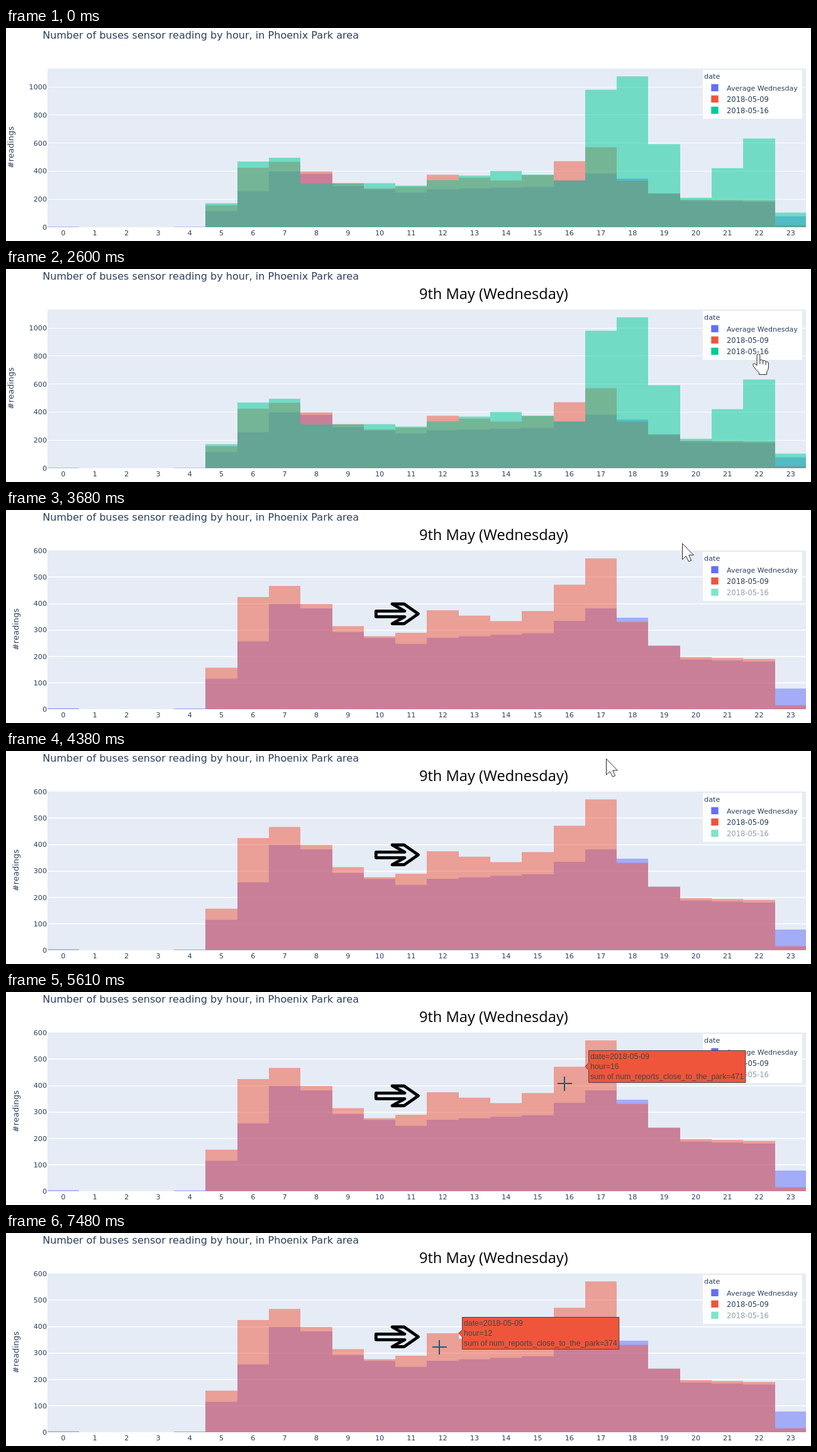
Animation, 1280 px wide and 340 px high, one loop 8 s. Source, as an HTML page with a canvas:

```html
<!DOCTYPE html>
<html lang="en">
<head>
<meta charset="utf-8">
<title>Bus sensor readings by hour</title>
<style>
  html, body { margin: 0; width: 100%; height: 100%; overflow: hidden; background: #fff; }
  canvas { display: block; }
</style>
</head>
<body>
<canvas id="stage" width="1280" height="340"></canvas>
<script>
const ctx = document.getElementById('stage').getContext('2d');
const LOOP = 8000, STEP = 77, HEADING_AT = 1890, FILTER_AT = 2910, CLICK = [2450, 2600];
const PLOT = { left: 66, right: 1272.9, top: 64.6, bottom: 318 };
const BIN = (PLOT.right - PLOT.left) / 24;
const INK = '#2a3f5f';
const SANS = '"DejaVu Sans", sans-serif';

// Turning points of each day by hour; the hours between them are interpolated
const series = [
  { name: 'Average Wednesday', color: '#636efa', size: 11.05,
    turns: { 0: 4, 1: 0, 3: 0, 4: 3, 5: 115, 7: 398, 8: 381, 9: 292, 11: 247, 12: 270, 15: 287, 17: 381, 18: 346, 19: 240, 20: 188, 22: 180, 23: 78 } },
  { name: '2018-05-09', color: '#ef553b', size: 11.5,
    turns: { 4: 0, 5: 157, 6: 424, 7: 466, 8: 398, 9: 314, 10: 276, 11: 289, 12: 374, 14: 333, 15: 371, 17: 570, 18: 330, 19: 240, 20: 197, 22: 190, 23: 15 } },
  { name: '2018-05-16', color: '#00cc96', size: 11.5,
    turns: { 4: 0, 5: 171, 6: 468, 7: 495, 8: 312, 10: 314, 11: 297, 12: 335, 14: 401, 15: 375, 16: 332, 17: 980, 18: 1075, 19: 592, 20: 210, 22: 632, 23: 104 } }
];
for (const day of series) day.values = Array.from({ length: 24 }, (_, hour) => valueAt(day.turns, hour));

// Pointer moves: first step, last step, destination
const moves = [
  [500, 1120, 1192, 27],
  [1270, 1660, 1185, 61],
  [1738, 2200, 1196, 135],
  [3140, 3910, 1029, 22],
  [3990, 4380, 954, 12],
  [4530, 5070, 951, 111],
  [5147, 5300, 940, 128],
  [5380, 5610, 888, 146],
  [7100, 7100, 873, 152],
  [7176, 7480, 689, 182]
];

const arrowPointer = new Path2D('M.5 .5V26L6.2 20.6L10.6 29.2L14.6 27.4L10.8 19H18.3Z');
const handPointer = new Path2D('M7 3Q7 .6 9.4 .6Q11.8 .6 11.8 3V11Q12.3 9.7 14 9.8Q16.6 10 16.6 12.5Q17 11 18.8 11.1Q21.2 11.4 21.2 14Q21.8 12.6 23.3 12.9Q25.4 13.3 25.4 16V22Q25.4 26 22.6 29V33.4H10.4V30.5Q5 26 1 19.5Q-.2 16.8 2 15.8Q4.2 15.2 7 19Z');
const handFolds = new Path2D('M11.8 11V17M16.6 12.5V17M21.2 14V18');
const bigArrow = new Path2D('M588.3 161.3H634L614 150H633L655.5 165.7L633 181.5H614L634 170.3H588.3Z');

function valueAt(turns, hour) {
  const hours = Object.keys(turns).map(Number);
  const next = hours.find(h => h >= hour);
  const last = hours.findLast(h => h <= hour) ?? next;
  const progress = (hour - last) / (next - last) || 0;
  return hour < hours[0] ? 0 : turns[last] + (turns[next] - turns[last]) * progress;
}

function text(str, x, y, size, { color = INK, align = 'left', font = SANS } = {}) {
  ctx.font = `${size}px ${font}`;
  ctx.fillStyle = color;
  ctx.textAlign = align;
  ctx.fillText(str, x, y);
}

function rect(color, x0, y0, x1, y1) {
  ctx.fillStyle = color;
  ctx.fillRect(x0, y0, x1 - x0, y1 - y0);
}

function pointerAt(t) {
  let x = 1268, y = 12;
  if (t < moves[0][0]) return null;
  for (const [start, end, toX, toY] of moves) {
    if (t < start) break;
    const steps = Math.round((end - start) / STEP) + 1;
    const interval = (end - start) / (steps - 1) || STEP;
    const step = Math.min(steps, Math.floor((t - start) / interval + .05) + 1);
    x += (toX - x) * step / steps;
    y += (toY - y) * step / steps;
  }
  return { x, y };
}

function pointerKind({ x, y }) {
  if (x >= 1108 && x <= 1266 && y >= 67 && y <= 145) return y > 87 ? 'hand' : 'arrow';
  return y >= PLOT.top && y <= PLOT.bottom && x >= PLOT.left && x <= PLOT.right ? 'cross' : 'arrow';
}

function drawChart(filtered, toY) {
  rect('#e5ecf6', PLOT.left, PLOT.top, 1272, PLOT.bottom);
  const tick = filtered ? 100 : 200, max = filtered ? 600 : 1000;
  const lineWidth = filtered ? 1.6 : 1;
  for (let v = 0; v <= max; v += tick) {
    const y = toY(v);
    if (v && y > PLOT.top + 2) {
      const top = Math.round(y - .5);
      rect('#fff', PLOT.left, top, 1272, top + lineWidth);
    }
    text(v, 65, y + 4, 11.2, { align: 'right' });
  }
  ctx.globalAlpha = .5;
  for (const { color, values } of filtered ? series.slice(0, 2) : series) {
    values.forEach((v, hour) => {
      const left = PLOT.left + hour * BIN;
      rect(color, Math.round(left), toY(v), Math.min(1272, Math.round(left + BIN)), PLOT.bottom);
    });
  }
  ctx.globalAlpha = 1;
  for (let hour = 0; hour < 24; hour++)
    text(hour, PLOT.left + (hour + .5) * BIN, 331, 11.2, { align: 'center' });

  text('Number of buses sensor reading by hour, in Phoenix Park area', 58.2, 17, 16.07);
  ctx.save();
  ctx.translate(filtered ? 20 : 12, 190.5);
  ctx.rotate(-Math.PI / 2);
  text('#readings', 0, 0, 13, { align: 'center' });
  ctx.restore();
}

function drawLegend(filtered) {
  rect('#fff', 1108, 67, 1266, 145);
  text('date', 1110, 81, 11.3);
  series.forEach(({ name, color, size }, i) => {
    const y = 95.3 + i * 18;
    ctx.globalAlpha = filtered && i === 2 ? .5 : 1;
    rect(color, 1121.3, y - 5.7, 1132.7, y + 5.7);
    text(name, 1146, y + 4.3, size);
  });
  ctx.globalAlpha = 1;
}

function drawTooltip({ x, y }, toY) {
  const hour = Math.floor((x - PLOT.left) / BIN);
  const hit = series.slice(0, 2).filter(s => toY(s.values[hour]) <= y)
    .sort((a, b) => a.values[hour] - b.values[hour])[0];
  if (!hit) return;
  const value = Math.ceil(hit.values[hour]);
  const lines = [`date=${hit.name}`, `hour=${hour}`, `sum of num_reports_close_to_the_park=${value}`];
  const tipX = PLOT.left + (hour + 1) * BIN, midY = Math.round(toY(value));
  const font = '"Liberation Sans", Arial, sans-serif', size = 12.28;
  ctx.font = `${size}px ${font}`;
  const left = tipX + 5.7, right = left + ctx.measureText(lines[2]).width + 5.6;
  ctx.beginPath();
  ctx.moveTo(tipX, midY);
  for (const [px, dy] of [[left, -5.7], [left, -25.5], [right, -25.5], [right, 25.5], [left, 25.5], [left, 5.7]])
    ctx.lineTo(px, midY + dy);
  ctx.closePath();
  ctx.fillStyle = hit.color;
  ctx.fill();
  ctx.strokeStyle = '#444';
  ctx.lineWidth = 1;
  ctx.stroke();
  lines.forEach((line, i) => text(line, left + 2.6, midY + (i - 1) * 16 + 4.3, size, { color: '#444', font }));
}

function drawPointer({ x, y }, kind) {
  ctx.save();
  if (kind === 'cross') {
    // The crosshair inverts what lies beneath it
    ctx.globalCompositeOperation = 'difference';
    ctx.translate(Math.round(x), Math.round(y));
    rect('#fff', -11, -1, 12, 1);
    rect('#fff', -1, -11, 1, -1);
    rect('#fff', -1, 1, 1, 12);
  } else {
    const hand = kind === 'hand';
    ctx.translate(Math.round(x) - (hand ? 9 : 0), Math.round(y));
    const shape = hand ? handPointer : arrowPointer;
    ctx.fillStyle = '#fff';
    ctx.strokeStyle = '#111';
    ctx.lineWidth = .9;
    ctx.fill(shape);
    ctx.stroke(shape);
    if (hand) ctx.stroke(handFolds);
  }
  ctx.restore();
}

function draw(t) {
  const filtered = t >= FILTER_AT;
  const scale = filtered ? (PLOT.bottom - PLOT.top) / 600 : .224;
  const toY = v => PLOT.bottom - v * scale;
  rect('#fff', 0, 0, 1280, 340);
  drawChart(filtered, toY);
  drawLegend(filtered);
  if (t >= HEADING_AT)
    text('9th May (Wednesday)', 657, 48, 23.65, { color: '#000', font: '"Open Sans", sans-serif' });
  if (filtered) {
    ctx.strokeStyle = '#000';
    ctx.lineWidth = 4.8;
    ctx.lineJoin = 'round';
    ctx.stroke(bigArrow);
  }
  const pointer = pointerAt(t);
  if (!pointer) return;
  const kind = pointerKind(pointer);
  if (kind === 'cross' && filtered) drawTooltip(pointer, toY);
  drawPointer(pointer, kind);
  if (t >= CLICK[0] && t < CLICK[1]) {
    ctx.fillStyle = 'rgba(255, 255, 0, .47)';
    ctx.beginPath();
    ctx.arc(pointer.x, pointer.y, 14, 0, Math.PI * 2);
    ctx.fill();
  }
}

const start = performance.now();
function tick() {
  draw((performance.now() - start) % LOOP);
  requestAnimationFrame(tick);
}
tick();
</script>
</body>
</html>
```
